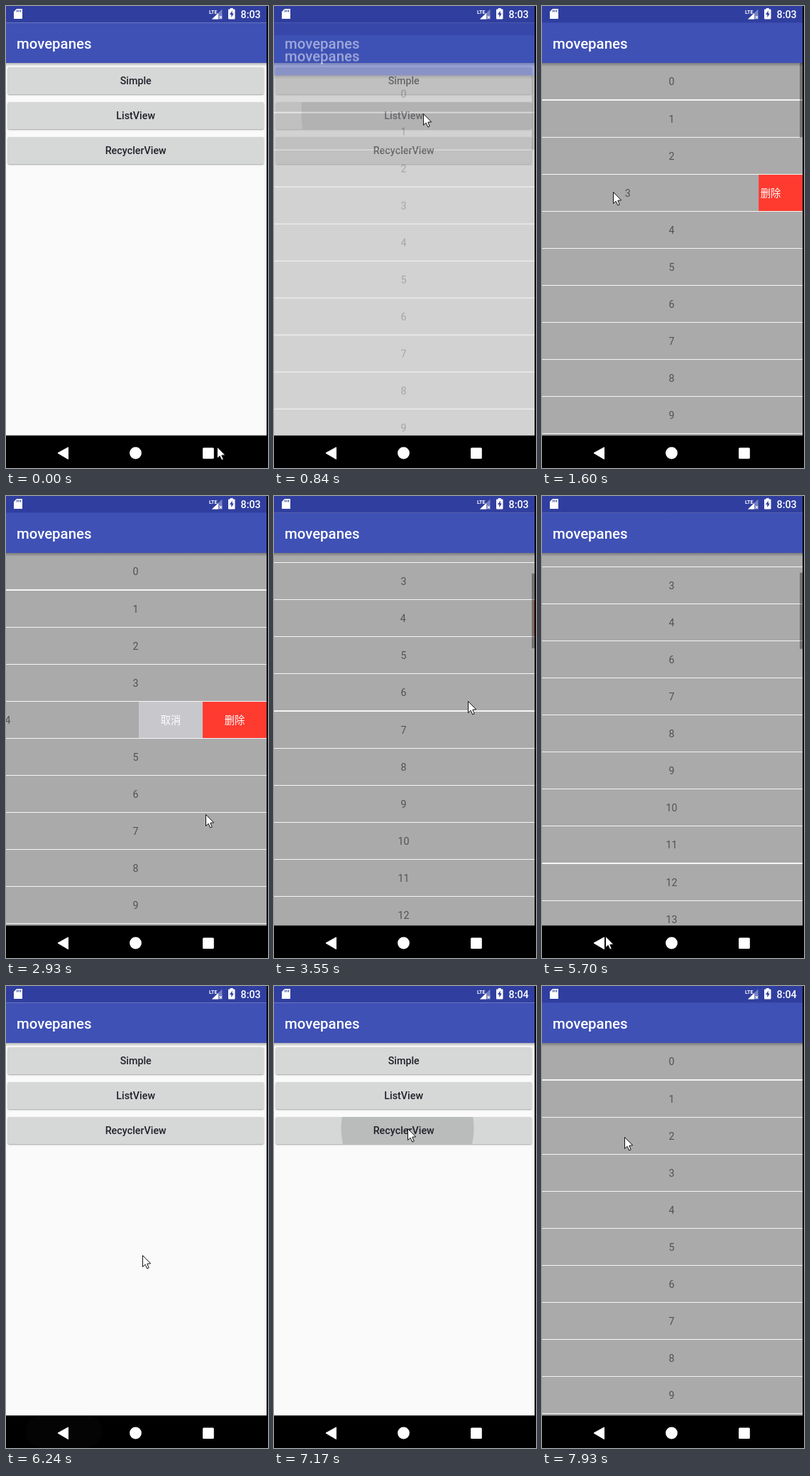
These frames come from a looping animation (369 by 649 pixels, 8 s). An HTML page with a canvas:

```html
<!DOCTYPE html>
<html lang="en">
<head>
<meta charset="utf-8">
<style>
  html, body { margin: 0; width: 100%; height: 100%; overflow: hidden; background: #000; }
  canvas { display: block; }
</style>
</head>
<body>
<canvas id="stage" width="369" height="649"></canvas>
<script>
const LOOP = 8000, WIDTH = 367, TOP = 80, BOTTOM = 603.5, PITCH = 52.1, MENU = 180;
const DELETE_AT = 4950, CLOSE_AT = 5950, REOPEN_AT = 7250;
const stage = document.getElementById('stage').getContext('2d');
const layerCanvas = document.createElement('canvas');
layerCanvas.width = 369;
layerCanvas.height = 649;
const layer = layerCanvas.getContext('2d');

const progress = (t, start, span) => Math.max(0, Math.min(1, (t - start) / span));
const smooth = p => p * p * (3 - 2 * p);
const easeOut = p => 1 - (1 - p) ** 3;

// Pointer moves: start time, end time, destination.
const START = [297, 619];
const MOVES = [
  [70, 290, 210, 151],
  [850, 1300, 165, 256],
  [1370, 1865, 20, 267],
  [1865, 2070, 200, 324],
  [2220, 2600, 20, 318],
  [2600, 2930, 281, 447],
  [3080, 3550, 273, 288],
  [3550, 3640, 272, 293.6],
  [3640, 3850, 260, 222],
  [3930, 4300, 70, 222],
  [4300, 4640, 320, 224],
  [5020, 5700, 89, 618],
  [5850, 6240, 192, 378],
  [6240, 6850, 188, 200],
  [7300, 7930, 116, 212]
];

function pointerAt(t) {
  return MOVES.reduce(([x, y], [start, end, toX, toY]) => {
    const p = smooth(progress(t, start, end - start));
    return [x + (toX - x) * p, y + (toY - y) * p];
  }, START);
}

// The list follows the pointer during its drag and then stays put.
function scrollAt(t) {
  const [, y] = pointerAt(Math.max(3080, Math.min(3640, t)));
  return Math.max(0, 430.6 - y);
}

const SWIPES = {
  3: { open: 1400, close: 2220 },
  4: { open: 2270, close: 3330 },
  5: { open: 3940, close: LOOP }
};

function slideAt(n, t) {
  const swipe = SWIPES[n];
  if (!swipe) return 0;
  const opened = smooth(progress(t, swipe.open, 510));
  const closed = smooth(progress(t, swipe.close, 230));
  return -MENU * (opened - closed);
}

function rect(c, color, x, y, w, h) {
  c.fillStyle = color;
  c.fillRect(x, y, w, h);
}

function rounded(c, color, x, y, w, h, r) {
  c.fillStyle = color;
  c.beginPath();
  c.roundRect(x, y, w, h, r);
  c.fill();
}

function circle(c, color, x, y, r) {
  c.fillStyle = color;
  c.beginPath();
  c.arc(x, y, r, 0, 2 * Math.PI);
  c.fill();
}

function polygon(c, color, points) {
  c.fillStyle = color;
  c.beginPath();
  points.forEach(([x, y]) => c.lineTo(x, y));
  c.closePath();
  c.fill();
}

function text(c, value, x, y, color, font, align = 'center') {
  c.font = font + ' Roboto, "Noto Sans CJK SC", "Noto Sans CJK", sans-serif';
  c.textAlign = align;
  c.fillStyle = color;
  c.fillText(value, x, y);
}

function appBar(c) {
  const shade = c.createLinearGradient(0, TOP, 0, TOP + 5);
  shade.addColorStop(0, 'rgba(0,0,0,.28)');
  shade.addColorStop(1, 'rgba(0,0,0,0)');
  rect(c, shade, 0, TOP, WIDTH, 5);
  rect(c, '#303f9f', 0, 0, WIDTH, 23.5);
  rect(c, '#3f51b5', 0, 23.5, WIDTH, TOP - 23.5);
  text(c, 'movepanes', 15, 60, '#fff', '500 20.4px', 'left');
}

function button(c, label, y, press, pointer) {
  c.save();
  c.shadowColor = 'rgba(0,0,0,.35)';
  c.shadowBlur = 2;
  c.shadowOffsetY = 1;
  rounded(c, '#d6d7d7', 2.5, y, 360.5, 38, 2);
  c.restore();
  if (press > 0 && press < 1) {
    c.save();
    c.clip();
    circle(c, 'rgba(0,0,0,.13)', ...pointer, 15 + 260 * press);
    c.restore();
  }
  text(c, label, 182.7, y + 24.2, '#21222a', '500 14.3px');
}

function drawMenu(c, t, pointer) {
  rect(c, '#fafafa', 0, 0, WIDTH, BOTTOM);
  const pressTimes = [LOOP, 540, 7020];
  ['Simple', 'ListView', 'RecyclerView'].forEach((label, i) =>
    button(c, label, 86 + 49 * i, progress(t, pressTimes[i], 500), pointer));
  appBar(c);
}

function drawRow(c, n, y, offset) {
  const h = PITCH - 1.1;
  if (offset < 0) {
    const w = MENU / 2, left = WIDTH - MENU;
    [['取消', '#c7c7cc'], ['删除', '#ff3b30']].forEach(([label, color], i) => {
      rect(c, color, left + w * i, y, w, h);
      text(c, label, left + w * (i + .5), y + 31, '#fff', '14.3px');
    });
  }
  rect(c, '#aaa', offset, y, WIDTH, h);
  text(c, n, 182.5 + offset, y + 30.6, '#525252', '14.3px');
}

function drawList(c, t) {
  const first = t < 6500, deleted = first && t >= DELETE_AT;
  const scroll = first ? scrollAt(t) : 0;
  c.clearRect(0, 0, 369, 649);
  c.save();
  c.beginPath();
  c.rect(0, 0, WIDTH, BOTTOM);
  c.clip();
  rect(c, '#f5f5f5', 0, TOP, WIDTH, BOTTOM - TOP);
  for (let i = 0; i < 15; i++) {
    const n = deleted && i > 4 ? i + 1 : i;
    const y = Math.round(TOP + .4 + i * PITCH - scroll);
    drawRow(c, n, y, first ? slideAt(n, t) : 0);
  }
  if (first) {
    const visible = 1 - progress(t, 2240, 260) + progress(t, 3100, 40);
    rect(c, `rgba(0,0,0,${.33 * visible})`, 363, TOP + scroll * .203, 4, deleted ? 107 : 105);
  }
  appBar(c);
  c.restore();
}

function drawStatus(c, t) {
  polygon(c, '#fff', [[15, 4], [23, 4], [23, 18], [11, 18], [11, 8]]);
  for (let i = 0; i < 3; i++) rect(c, '#303f9f', 15 + 2.5 * i, 5.5, 1.2, 3);
  polygon(c, 'rgba(255,255,255,.35)', [[304.5, 4.5], [304.5, 18.5], [290, 18.5]]);
  polygon(c, '#fff', [[299, 10], [299, 18.5], [290, 18.5]]);
  text(c, 'LTE', 286, 10.5, '#fff', 'bold 7px', 'left');
  text(c, '×', 302.3, 19, '#fff', 'bold 9px');
  rounded(c, '#fff', 313, 4.5, 9.5, 14, 1);
  rect(c, '#fff', 315.7, 3, 4, 2);
  polygon(c, '#303f9f', [[318.7, 6.5], [315, 12], [317.3, 12], [317.3, 16], [320.8, 10.5], [318.7, 10.5]]);
  text(c, t < 6690 ? '8:03' : '8:04', 330.5, 16.5, '#fff', '500 14.3px', 'left');
}

function drawNav(c, t) {
  rect(c, '#000', 0, BOTTOM, 369, 649 - BOTTOM);
  rect(c, '#000', WIDTH, 0, 2, 649);
  if (t > 5850) {
    const glow = .12 * (1 - progress(t, 5850, 450));
    rounded(c, `rgba(255,255,255,${glow})`, 28, BOTTOM, 107, 45, 22);
  }
  polygon(c, '#fff', [[73, 628], [87.5, 620], [87.5, 636.5]]);
  c.strokeStyle = '#fff';
  c.lineJoin = 'round';
  c.stroke();
  circle(c, '#fff', 182.5, 628, 8.4);
  rounded(c, '#fff', 277, 620.5, 15.8, 15.5, 1.5);
}

function drawCursor(c, [x, y]) {
  c.save();
  c.translate(Math.round(x) + .5, Math.round(y) + .5);
  polygon(c, '#fff', [[0, 0], [0, 16], [3.6, 12.7], [6.3, 18.5], [8.7, 17.4], [6.3, 11.7], [11.2, 11.4]]);
  c.strokeStyle = '#111';
  c.lineJoin = 'miter';
  c.stroke();
  c.restore();
}

// How far the list window has appeared: opacity and downward shift.
function listWindow(t) {
  if (t >= CLOSE_AT && t < REOPEN_AT) {
    const p = progress(t, CLOSE_AT, 220);
    return { alpha: 1 - p, shift: 48 * p * p };
  }
  const start = t < CLOSE_AT ? 750 : REOPEN_AT;
  return { alpha: progress(t, start, 180), shift: 48 * (1 - easeOut(progress(t, start, 320))) };
}

function draw() {
  const t = performance.now() % LOOP;
  const pointer = pointerAt(t);
  const { alpha, shift } = listWindow(t);
  if (alpha < 1) drawMenu(stage, t, pointer);
  if (alpha > 0) {
    drawList(layer, t);
    stage.globalAlpha = alpha;
    stage.drawImage(layerCanvas, 0, shift);
    stage.globalAlpha = 1;
  }
  drawStatus(stage, t);
  drawNav(stage, t);
  drawCursor(stage, pointer);
  requestAnimationFrame(draw);
}

draw();
</script>
</body>
</html>
```
